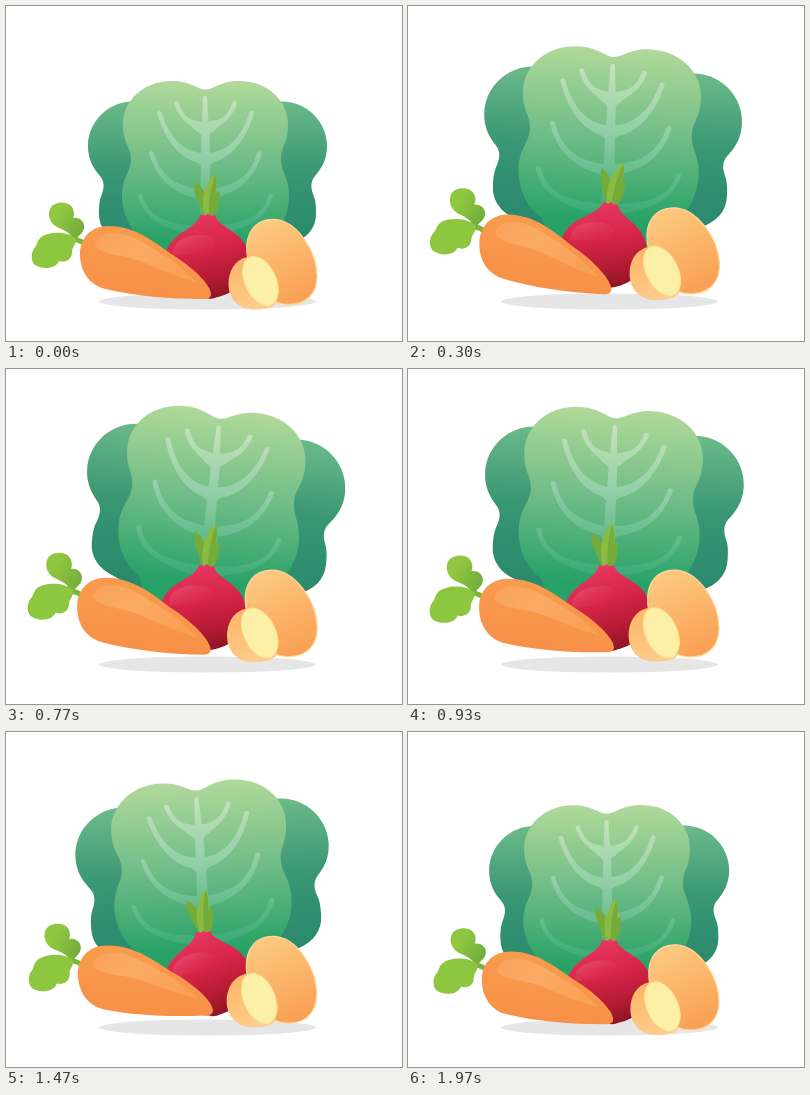
An HTML page that plays this animation: 396 by 335 pixels, repeating every 2.01 s.

```html
<!DOCTYPE html>
<html lang="en">
<head>
<meta charset="utf-8">
<title>Vegetables</title>
<style>
  html, body { margin: 0; width: 100%; height: 100%; overflow: hidden; background: #fff; }
  svg { display: block; width: 100vw; height: 100vh; }
</style>
</head>
<body>
<svg viewBox="0 0 396 335">
  <defs>
    <linearGradient id="outer" gradientUnits="userSpaceOnUse" x1="0" y1="95" x2="0" y2="236">
      <stop offset="0" stop-color="#6cba89"/>
      <stop offset=".48" stop-color="#3b9875"/>
      <stop offset=".75" stop-color="#2f8f70"/>
      <stop offset="1" stop-color="#2a8a6b"/>
    </linearGradient>
    <linearGradient id="inner" gradientUnits="userSpaceOnUse" x1="0" y1="75" x2="0" y2="236">
      <stop offset="0" stop-color="#b1d99a"/>
      <stop offset=".5" stop-color="#71bd88"/>
      <stop offset="1" stop-color="#27a166"/>
    </linearGradient>
    <linearGradient id="vein" gradientUnits="userSpaceOnUse" x1="0" y1="90" x2="0" y2="232">
      <stop offset="0" stop-color="#c6e4b9"/>
      <stop offset=".45" stop-color="#8fcea6"/>
      <stop offset="1" stop-color="#36a973"/>
    </linearGradient>
    <linearGradient id="root" x1=".35" y1="0" x2=".6" y2="1">
      <stop offset="0" stop-color="#e93862"/>
      <stop offset=".45" stop-color="#d52446"/>
      <stop offset=".75" stop-color="#b51b35"/>
      <stop offset="1" stop-color="#8c1523"/>
    </linearGradient>
    <linearGradient id="gloss" x1="0" y1="0" x2="1" y2="1">
      <stop offset="0" stop-color="#ee5f7d" stop-opacity=".75"/>
      <stop offset="1" stop-color="#d52446" stop-opacity="0"/>
    </linearGradient>
    <linearGradient id="peel" x1=".6" y1="0" x2=".4" y2="1">
      <stop offset="0" stop-color="#f99c4e"/>
      <stop offset="1" stop-color="#f79047"/>
    </linearGradient>
    <linearGradient id="shine" x1="0" y1="0" x2="1" y2=".6">
      <stop offset="0" stop-color="#fbae6b" stop-opacity=".4"/>
      <stop offset=".45" stop-color="#fbab66"/>
      <stop offset="1" stop-color="#faa35a" stop-opacity=".8"/>
    </linearGradient>
    <linearGradient id="sprig" x1="0" y1="0" x2="1" y2=".6">
      <stop offset=".35" stop-color="#8fc741"/>
      <stop offset="1" stop-color="#75ae3a"/>
    </linearGradient>
    <linearGradient id="skin" x1=".3" y1="0" x2=".7" y2="1">
      <stop offset="0" stop-color="#fec981"/>
      <stop offset="1" stop-color="#f99f52"/>
    </linearGradient>
    <linearGradient id="half" x1=".2" y1="0" x2=".6" y2="1">
      <stop offset="0" stop-color="#fbb568"/>
      <stop offset="1" stop-color="#fecd8d"/>
    </linearGradient>
  </defs>

  <ellipse cx="201.5" cy="295.5" rx="108.5" ry="8" fill="#e6e6e6"/>

  <g id="cabbage">
    <g id="sides" fill="url(#outer)"></g>
    <path fill="url(#inner)" d="M199.500 83.500C208 83.500 214 75 233 75C263 75 282 96 282 118C282 138 275 140 275 153C275 166 283 171 283 190C283 210 273 226 262 234C256 240 258 252 245 264H155C142 252 144 240 138 234C126 226 116 210 116 190C116 171 125 166 125 153C125 140 117 138 117 118C117 96 136 75 166 75C185 75 191 83.500 199.500 83.500Z"/>
    <g id="veins" fill="url(#vein)">
      <path d="M197 91.500Q199 87.500 201 91.500L203.500 130L206 260H193L195.500 130Z"/>
    </g>
  </g>

  <g id="beet">
    <path fill="#75ab3a" d="M198 211C194 199 186 186 188.500 176C196 179 204 192 203 211Z"/>
    <path fill="#8abc44" d="M199 211C194 194 199 176 209 167.500C214 179 208 195 206 211Z"/>
    <path fill="#75ab3a" d="M203 211C203 200 205 189 213 185C215 195 212 204 208 211Z"/>
    <path fill="#75ab3a" d="M203 206C203 192 205 181 209 168.500C213 180 207 194 205 207Z"/>
    <path fill="url(#root)" d="M194.500 208Q201 211 202 207Q204 211 209 209C212 223 243 225 243 254C243 278 226 288 210 291.500Q204 294 198 291.500C178 288 159 278 159 254C159 227 192 224 194.500 208Z"/>
    <path fill="url(#gloss)" d="M167 250C166 236 178 229 196 229C207 229 211 233 208 240C202 251 183 246 167 250Z"/>
  </g>

  <g id="carrot">
    <path fill="none" stroke="#7cb639" stroke-width="5" d="M64 234Q73 232 81 240"/>
    <path fill="url(#sprig)" d="M67 232C62 225 57 224 51 221C43 217 41 207 45 201C50 195 62 195 66 201C69 206 68 210 67 212C74 211 79 216 78 222C77 228 72 229 70 234Z"/>
    <path fill="#8dc63f" d="M70 233C62 226 50 226 42 228C32 230 31 238 30 240C25 245 24 254 29 259C37 264 50 263 53 255C59 257 66 254 66 246C66 241 70 240 70 233Z"/>
    <path fill="url(#peel)" d="M74 248C74 231 86 220 102 220C132 220 151 239 170 251C190 264 205 280 205 288C205 292 202 293 197 293C165 293 128 290 100 283C82 279 74 264 74 248Z"/>
    <path fill="url(#shine)" d="M89 239C91 225 113 224 130 233C151 244 174 258 191 276C174 272 156 264 137 256C114 247 96 250 89 239Z"/>
  </g>

  <g id="potatoes">
    <path fill="url(#skin)" stroke="#ffd797" stroke-width="1.200" d="M241 247C239 226 250 213.500 267 213.500C290 213.500 311 245 311 270C311 288 300 298.500 283 298.500C258 298.500 243 272 241 247Z"/>
    <path fill="url(#half)" d="M241 251C228 254 222.500 266 222.500 278C222.500 293 233 303.500 248 303.500C258 303.500 267 302 271 297Z"/>
    <ellipse cx="254.500" cy="275" rx="15.500" ry="26" transform="rotate(-25 254.500 275)" fill="#fbf0a5" stroke="#fde196" stroke-width="1"/>
  </g>
</svg>
<script>
const LOOP = 2010, FRAMES = 60;
const $ = id => document.getElementById(id);

const addPath = (parent, d, transform = '') => {
  const path = document.createElementNS('http://www.w3.org/2000/svg', 'path');
  path.setAttribute('d', d);
  path.setAttribute('transform', transform);
  parent.append(path);
};

// Mirrored outer leaves
const side = 'M127 95.5C102 95.5 82 116 82 140C82 154 88 163 94 170C99 176 98 182 96 188C93 195 93 201 93 208C93 222 102 232 115 237C132 244 150 262 180 264V110C165 100 145 95.5 127 95.5Z';
addPath($('sides'), side);
addPath($('sides'), side, 'translate(403 0) scale(-1 1)');

// Tapered veins: tip x, tip y, height where they meet the rib
const addVein = (x, y, join) => {
  const s = x < 200 ? 1 : -1;
  addPath($('veins'),
    `M${x - 2 * s} ${y}Q${x - s} ${y - 3} ${x + 2.5 * s} ${y - 1}` +
    `C${x + 8 * s} ${y + 18} ${x + 20 * s} ${join - 11} ${199 - 3 * s} ${join - 9}` +
    `L199 ${join + 14}Q${199 - 2 * s} ${join + 3} ${199 - 9 * s} ${join}` +
    `C${x + 14 * s} ${join - 7} ${x + 3 * s} ${y + 17} ${x - 2 * s} ${y}Z`);
};
[[170, 97, 125], [153, 107, 156], [145, 147, 192], [134, 190, 229]].forEach(([x, y, join]) => {
  addVein(x, y, join);
  addVein(399 - x, y, join);
});

// Tracks of [frame, value]
const lift = [[0, 0], [9.5, 1], [38, 1], [60, 0]];
const sway = [[0, 0], [9, .65], [15, 1], [28, -.2], [38, -.75], [49, -.4], [60, 0]];
const tilt = [[0, 0], [4, .6], [9, 2.5], [16, 6], [20, 6.4], [24, 5.4], [28, 3.2], [37, -3.9], [40, -4.2], [49, -2.1], [60, 0]];

const valueAt = (track, f) => {
  const i = track.findIndex(([end]) => end >= f) || 1;
  const [a, from] = track[i - 1], [b, to] = track[i];
  return from + (to - from) * (f - a) / (b - a);
};

const parts = [
  { id: 'cabbage', x: 200, y: 225, dx: -.5, dy: -22.6, grow: .084, track: tilt, turn: 1 },
  { id: 'beet', x: 201, y: 232, dx: -2.5, dy: -12, grow: .02, track: sway, turn: 12 },
  { id: 'carrot', x: 130, y: 250, dx: -1.5, dy: -9.8, grow: .025, track: sway, turn: 4.5 },
  { id: 'potatoes', x: 267, y: 258, dx: -.8, dy: -11.5, grow: .02, track: sway, turn: -3 }
];

function draw(now) {
  const f = now % LOOP / LOOP * FRAMES;
  const up = valueAt(lift, f);
  for (const p of parts) {
    const angle = p.turn * valueAt(p.track, f);
    $(p.id).setAttribute('transform',
      `translate(${p.x + p.dx * up} ${p.y + p.dy * up}) rotate(${angle}) ` +
      `scale(${1 + p.grow * up}) translate(${-p.x} ${-p.y})`);
  }
}

const start = performance.now();
const tick = () => {
  draw(performance.now() - start);
  requestAnimationFrame(tick);
};
tick();
</script>
</body>
</html>
```
